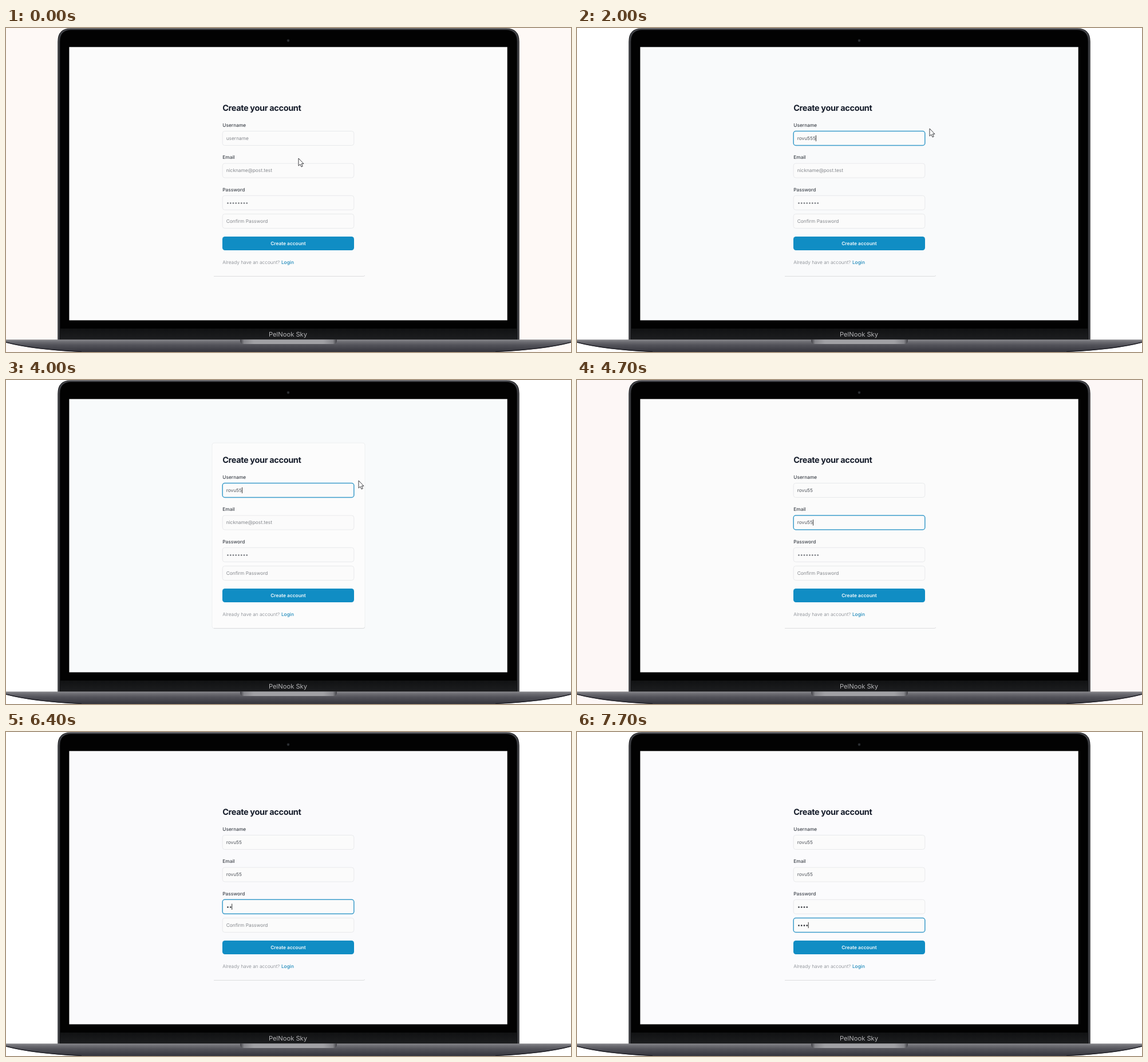
An HTML page for the animation above (8 s loop, 987 px wide and 567 px high).

```html
<!DOCTYPE html>
<html lang="en">
<head>
<meta charset="utf-8">
<title>Sign-up form</title>
<style>
  html, body { margin: 0; width: 100%; height: 100%; overflow: hidden; background: #fff; }
  svg { display: block; width: 100%; height: 100%; }
  text { font: 400 8.34px Inter, Arial, sans-serif; text-rendering: geometricPrecision; white-space: pre; }
  .title { font-size: 14.5px; font-weight: 680; letter-spacing: -.025em; fill: #161d2b; }
  .label { font-weight: 500; fill: #3f444c; }
  .value { fill: #54585f; }
  .hint { fill: #85888d; }
  .brand { font-size: 11.2px; fill: #b4b4b6; }
  .mid { text-anchor: middle; }
</style>
</head>
<body>
<svg viewBox="0 0 987 567" preserveAspectRatio="none">
  <defs>
    <linearGradient id="chin" x2="0" y2="1">
      <stop offset="0" stop-color="#111213"/>
      <stop offset="1" stop-color="#1d1e20"/>
    </linearGradient>
    <linearGradient id="base" x2="0" y2="1">
      <stop offset="0" stop-color="#8a8a8e"/>
      <stop offset=".18" stop-color="#6c6c72"/>
      <stop offset=".45" stop-color="#525259"/>
      <stop offset="1" stop-color="#34343c"/>
    </linearGradient>
    <linearGradient id="notch" x2="1" y2="0">
      <stop offset="0" stop-color="#3e3e43"/>
      <stop offset=".04" stop-color="#85858a"/>
      <stop offset=".14" stop-color="#a0a0a4"/>
      <stop offset=".86" stop-color="#a0a0a4"/>
      <stop offset=".96" stop-color="#85858a"/>
      <stop offset="1" stop-color="#3e3e43"/>
    </linearGradient>
  </defs>

  <rect id="wall" width="987" height="567"/>

  <!-- laptop -->
  <path d="M90.3 546V24Q90.3 .6 113 .6H874Q896.7 .6 896.7 24V546Z" fill="#222326"/>
  <path d="M92.4 546V24Q92.4 2.2 113.5 2.2H873.5Q894.6 2.2 894.6 24V546" fill="none" stroke="#505156" stroke-width="1.4"/>
  <path d="M94.6 545V24Q94.6 3.4 114 3.4H873Q892.4 3.4 892.4 24V545Z" fill="#020202"/>
  <rect x="95" y="526" width="797" height="20" fill="url(#chin)"/>
  <circle cx="493" cy="22" r="2.4" fill="#222427"/>
  <circle cx="493" cy="22" r="1" fill="#343a40"/>
  <text class="brand mid" x="492.5" y="540.3">PelNook Sky</text>
  <path d="M0 545.3H987V550.5Q940 563 855 567H132Q47 563 0 550.5Z" fill="url(#base)"/>
  <path d="M0 550Q47 562.5 132 566.5M987 550Q940 562.5 855 566.5" fill="none" stroke="#1f1f26" stroke-width="1.3"/>
  <path d="M409 545.3H578V547Q578 553 571 553H416Q409 553 409 547Z" fill="url(#notch)"/>

  <!-- page -->
  <rect id="page" x="110.4" y="33.3" width="765.3" height="478.2"/>
  <rect id="card" x="360" y="110" width="267" height="325" rx="4" fill="#fcfcfc" stroke="#eef0f1"/>
  <path d="M363 434.5H624Q626 434.5 627 433" fill="none" stroke="#dcddde"/>
  <text class="title" x="378.2" y="145">Create your account</text>
  <text class="label" x="378.3" y="173.2">Username</text>
  <text class="label" x="378.3" y="229">Email</text>
  <text class="label" x="378.3" y="285.5">Password</text>
  <g id="form"></g>
  <rect x="378" y="365" width="230" height="24" rx="4.5" fill="#108dc4"/>
  <text class="mid" x="493" y="380" style="font-weight:600" fill="#f2f9fc">Create account</text>
  <text x="378.3" y="412.5" style="font-weight:300" fill="#7d8188">Already have an account?</text>
  <text x="480.9" y="412.5" style="font-weight:500" fill="#1f8abb">Login</text>
  <path id="caret" stroke="#222" stroke-width=".9"/>
  <path id="mouse" d="M0 0V13.2L3 10.4L5 15L7.2 14L5.2 9.6H9Z" fill="#fff" stroke="#26282c" stroke-width=".9" stroke-linejoin="round"/>
</svg>

<script>
const LOOP = 8000;
const USER = "rovu555", SHORT = "rovu55";
const $ = id => document.getElementById(id);

function add(parent, tag, attrs) {
  const el = document.createElementNS("http://www.w3.org/2000/svg", tag);
  for (const k in attrs) el.setAttribute(k, attrs[k]);
  return parent.appendChild(el);
}

const fields = [
  { y: 180.5, hint: "username" },
  { y: 237, hint: "nickname@post.test" },
  { y: 293.3, hint: 8, secret: true },
  { y: 325.5, hint: "Confirm Password", secret: true }
];
for (const f of fields) {
  f.box = add($("form"), "rect", { x: 378.2, y: f.y, width: 229.6, height: 25, rx: 4 });
  f.text = add($("form"), "text", { x: 384.7, y: f.y + 15.3 });
  f.dots = add($("form"), "g", {});
  if (f.secret) for (let i = 0; i < 8; i++)
    add(f.dots, "circle", { cx: 387.5 + i * 4.75, cy: f.y + 13.2, r: 1.35 });
}

// Each step keeps the values it does not change.
const steps = [
  { at: 0, mouse: [511, 228], focus: -1, caret: 0, values: ["", "", 0, 0], wall: "#fef9f6", page: "#fbfbfb", card: 0 },
  { at: 100, mouse: [525, 221], wall: "#fff" },
  { at: 200, mouse: [548, 210] },
  { at: 400, mouse: [571, 198] },
  { at: 500, mouse: [588, 190], focus: 0, caret: 1 },
  { at: 800, mouse: [616, 176], caret: 0 },
  { at: 1100, name: 1, caret: 1 },
  { at: 1300, name: 2 },
  { at: 1400, name: 4, page: "#f9fafb" },
  { at: 1700, name: 5 },
  { at: 1800, name: 6 },
  { at: 2000, name: 7 },
  { at: 2400, caret: 0 },
  { at: 2700, name: 4, caret: 1 },
  { at: 3200, name: 0, page: "#f8fafb", card: 1 },
  { at: 3700, name: 4 },
  { at: 4000, name: 6 },
  { at: 4500, focus: 1, mail: 3, mouse: null, card: 0 },
  { at: 4700, mail: 6, wall: "#fdf7f6", page: "#fbfbfb" },
  { at: 5200, caret: 0, wall: "#fff", page: "#fafafc" },
  { at: 5600, focus: 2, caret: 1 },
  { at: 6000, pass: 1 },
  { at: 6400, pass: 2 },
  { at: 6500, pass: 3 },
  { at: 6700, pass: 4 },
  { at: 7000, focus: 3, page: "#fbfbfd" },
  { at: 7300, again: 1 },
  { at: 7500, again: 3 },
  { at: 7700, again: 4 }
];
let last = {};
const states = steps.map(step => {
  const s = { ...last, ...step };
  s.values = [USER.slice(0, s.name || 0), SHORT.slice(0, s.mail || 0), s.pass || 0, s.again || 0];
  return last = s;
});

function drawField(f, value, on) {
  const empty = !value, shown = empty ? f.hint : value;
  const dots = typeof shown === "number" ? shown : 0;
  f.box.setAttribute("fill", "#fbfbfb");
  f.box.setAttribute("stroke", on ? "#3d9dcb" : "#e4e5e7");
  f.box.setAttribute("stroke-width", on ? 1.5 : .8);
  f.text.textContent = dots ? "" : shown;
  f.text.setAttribute("class", empty ? "hint" : "value");
  f.dots.setAttribute("fill", empty ? "#74777d" : "#33363c");
  [...f.dots.children].forEach((d, i) => d.setAttribute("opacity", i < dots ? 1 : 0));
}

function draw(s) {
  $("wall").setAttribute("fill", s.wall);
  $("page").setAttribute("fill", s.page);
  $("card").setAttribute("opacity", s.card);
  fields.forEach((f, i) => drawField(f, s.values[i], i === s.focus));

  const f = fields[s.focus];
  $("caret").setAttribute("opacity", f && s.caret ? 1 : 0);
  if (f) {
    const value = s.values[s.focus];
    const width = !value ? 0 : f.secret ? value * 4.75 : f.text.getComputedTextLength();
    const x = 385.2 + width;
    $("caret").setAttribute("d", `M${x} ${f.y + 7.3}v10.4`);
  }
  $("mouse").setAttribute("opacity", s.mouse ? 1 : 0);
  if (s.mouse) $("mouse").setAttribute("transform", `translate(${s.mouse})`);
}

let shown = null;
function tick() {
  const t = performance.now() % LOOP;
  const s = states.filter(v => v.at <= t).pop();
  if (s !== shown) draw(shown = s);
  requestAnimationFrame(tick);
}
tick();
</script>
</body>
</html>
```
